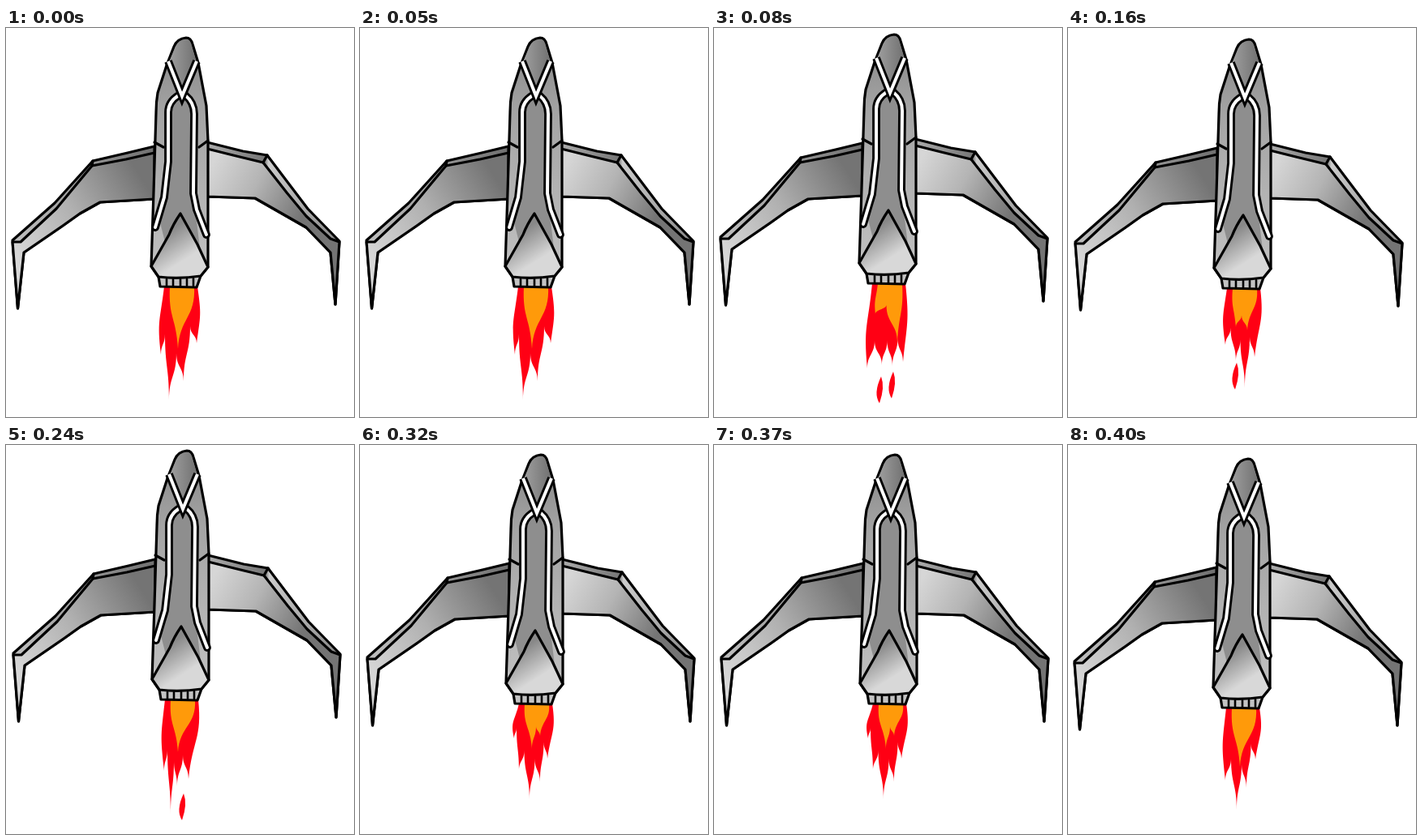
Recreate the animation shown at these times as an HTML page. Size 429x480 px, loop 0.48 s.

```html
<!DOCTYPE html>
<html lang="en">
<head>
<meta charset="utf-8">
<title>Rocket ship</title>
<style>
  html, body { margin: 0; width: 100%; height: 100%; overflow: hidden; background: #fff; }
  svg { display: block; width: 100vw; height: 100vh; }
  #ship { stroke: #000; stroke-width: 3.2; stroke-linejoin: round; stroke-linecap: round; fill: none; }
  .border { stroke-width: 9.8; }
  .stripe { stroke: #fff; stroke-width: 4; }
  .fill { stroke: none; }
</style>
</head>
<body>
<svg viewBox="0 0 429 480">
  <defs>
    <linearGradient id="leftWing" gradientUnits="userSpaceOnUse" x1="8" y1="280" x2="182" y2="170">
      <stop stop-color="#d8d8d8"/><stop offset=".45" stop-color="#b0b0b0"/><stop offset=".9" stop-color="#747474"/>
    </linearGradient>
    <linearGradient id="rightWing" gradientUnits="userSpaceOnUse" x1="250" y1="175" x2="400" y2="260">
      <stop stop-color="#d6d6d6"/><stop offset=".35" stop-color="#b4b4b4"/><stop offset=".75" stop-color="#747474"/>
    </linearGradient>
    <linearGradient id="leftBand" gradientUnits="userSpaceOnUse" x1="20" y1="0" x2="182" y2="0">
      <stop stop-color="#bbb"/><stop offset="1" stop-color="#707070"/>
    </linearGradient>
    <linearGradient id="rightBand" gradientUnits="userSpaceOnUse" x1="250" y1="0" x2="410" y2="0">
      <stop stop-color="#aaa"/><stop offset=".43" stop-color="#777"/><stop offset=".46" stop-color="#ccc"/><stop offset="1" stop-color="#888"/>
    </linearGradient>
    <linearGradient id="hull" x1="0" y1="0" x2="0" y2="1">
      <stop stop-color="#858585"/><stop offset=".3" stop-color="#a4a4a4"/><stop offset="1" stop-color="#c4c4c4"/>
    </linearGradient>
    <linearGradient id="nose">
      <stop stop-color="#a0a0a0"/><stop offset="1" stop-color="#707070"/>
    </linearGradient>
    <linearGradient id="tail" gradientUnits="userSpaceOnUse" x1="198" y1="252" x2="224" y2="292">
      <stop stop-color="#888"/><stop offset=".85" stop-color="#d8d8d8"/>
    </linearGradient>
    <path id="rails" d="M213 83Q200 91 200 104V165L195 209L184 246M221 83Q232 92 232 106L231 204L235 224L247 255"/>
    <path id="vee" d="M200 41L217 84L235 41"/>
  </defs>

  <path id="red" fill="#ff0014"/>
  <path id="orange" fill="#ff9a0a"/>

  <g id="ship">
    <g id="wings"></g>

    <path fill="url(#hull)" d="M222 12Q211 13 207 23L198 46L187 80Q185 91 185 104L182 202L179 294L188 307L190 319L235 320L240 306L249 295V139L247 96L237 43L230 20Q228 12 222 12Z"/>
    <path class="fill" fill="url(#nose)" d="M222 14Q212 15 209 23L200 44L217 84L235 44L229 22Q227 14 222 14Z"/>
    <path class="fill" fill="#8e8e8e" d="M217 86L201 99L199 170L190 240L196 264L214 230L239 272L231 205L232 100Z"/>
    <path d="M183 141L194 147M238 147L249 139"/>

    <use href="#rails" class="border"/>
    <use href="#rails" class="stripe"/>
    <g stroke-linejoin="miter" stroke-linecap="butt">
      <use href="#vee" class="border"/>
      <use href="#vee" class="stripe"/>
    </g>

    <path fill="url(#tail)" d="M215 229Q206 242 201 255L179 294L188 307Q213 310 240 306L249 295L236 267Z"/>
    <path stroke-width="2.6" d="M198 310V318M206 310V318M215 310V318M223 310V318M231 309V318"/>
  </g>
</svg>
<script>
const STEP = 80, NOZZLE = 319;

// Every pose: ship offset, then the tips of the flame's tongues as x, y pairs.
const poses = [
  { shift: [0, 0], red: [191, 403, 201, 459, 219, 436, 235, 389], orange: [212, 396] },
  { shift: [0, -4], red: [189, 420, 207, 416, 220, 417, 233, 412], orange: [199, 353, 226, 388], drops: [204, 447, 219, 441] },
  { shift: [1, 2], red: [194, 391, 207, 411, 218, 444, 230, 406], orange: [207, 369, 221, 373], drops: [206, 430] },
  { shift: [1, -5], red: [195, 402, 203, 456, 211, 421, 225, 412], orange: [212, 379], drops: [217, 447] },
  { shift: [1, 0], red: [190, 362, 196, 402, 209, 437, 222, 416, 231, 387], orange: [212, 375, 222, 359] },
  { shift: [0, 5], red: [194, 414, 208, 450, 220, 423, 231, 388], orange: [212, 397] }
];

const pairs = list => list.flatMap((x, i) => i % 2 ? [] : [[x, list[i + 1]]]);

// Tongues hang from the nozzle; each gap reaches 70% of the shorter neighbour.
function flame(tips, left, right, top, bulge) {
  let d = `M${left} ${top - 6}`, from = [left, top];
  const edge = (to, push = 0) => {
    const mid = (from[1] + to[1]) / 2;
    d += `L${from}C${from[0] + push} ${mid} ${to[0] + push} ${mid} ${to}`;
    from = to;
  };
  tips.forEach((tip, i) => {
    const next = tips[i + 1];
    edge(tip, i ? 0 : -bulge);
    if (next) edge([(tip[0] + next[0]) / 2, top + 0.7 * (Math.min(tip[1], next[1]) - top)]);
  });
  edge([right, top], bulge);
  return d + `V${top - 6}Z`;
}

const drop = ([x, y]) => `M${x + 2} ${y - 17}Q${x - 8} ${y + 4} ${x} ${y + 16}Q${x + 7} ${y - 4} ${x + 2} ${y - 17}Z`;

// A wing is a leading-edge band with the main panel laid over it.
function wing(side, outer, inner, lower) {
  const shape = (top, paint) => `<path fill="url(#${side}${paint})" d="M${top}L${lower}Z"/>`;
  const seam = `<path d="M${outer[2]}L${inner[2]}"/>`;
  return shape(outer.join("L"), "Band") + shape(inner.join("L"), "Wing") + seam;
}

const $ = id => document.getElementById(id);
$("wings").innerHTML =
  wing("left",
    [[183, 146], [150, 154], [107, 164], [60, 216], [8, 262]],
    [[183, 154], [148, 162], [106, 170], [62, 223], [18, 264], [8, 264]],
    "14.5 346L22 277L70 244L91 229L116 215L183 211") +
  wing("right",
    [[248, 141], [292, 152], [322, 157], [350, 194], [372, 223], [411, 263]],
    [[248, 149], [280, 157], [317, 166], [346, 203], [370, 232], [400, 260], [411, 264]],
    "406 341L400 277L370 246L307 210L248 208");

const frames = poses.map(({ shift, red, orange, drops = [] }) => {
  const [dx, dy] = shift, top = NOZZLE + dy;
  return {
    red: flame(pairs(red), 195 + dx, 236 + dx, top, 5) + pairs(drops).map(drop).join(""),
    orange: flame(pairs(orange), 202 + dx, 232 + dx, top, 2),
    move: `translate(${shift})`
  };
});

const start = performance.now();

function draw(now) {
  const frame = frames[Math.floor(Math.max(0, now - start) / STEP) % frames.length];
  $("red").setAttribute("d", frame.red);
  $("orange").setAttribute("d", frame.orange);
  $("ship").setAttribute("transform", frame.move);
  requestAnimationFrame(draw);
}
draw(start);
</script>
</body>
</html>
```
